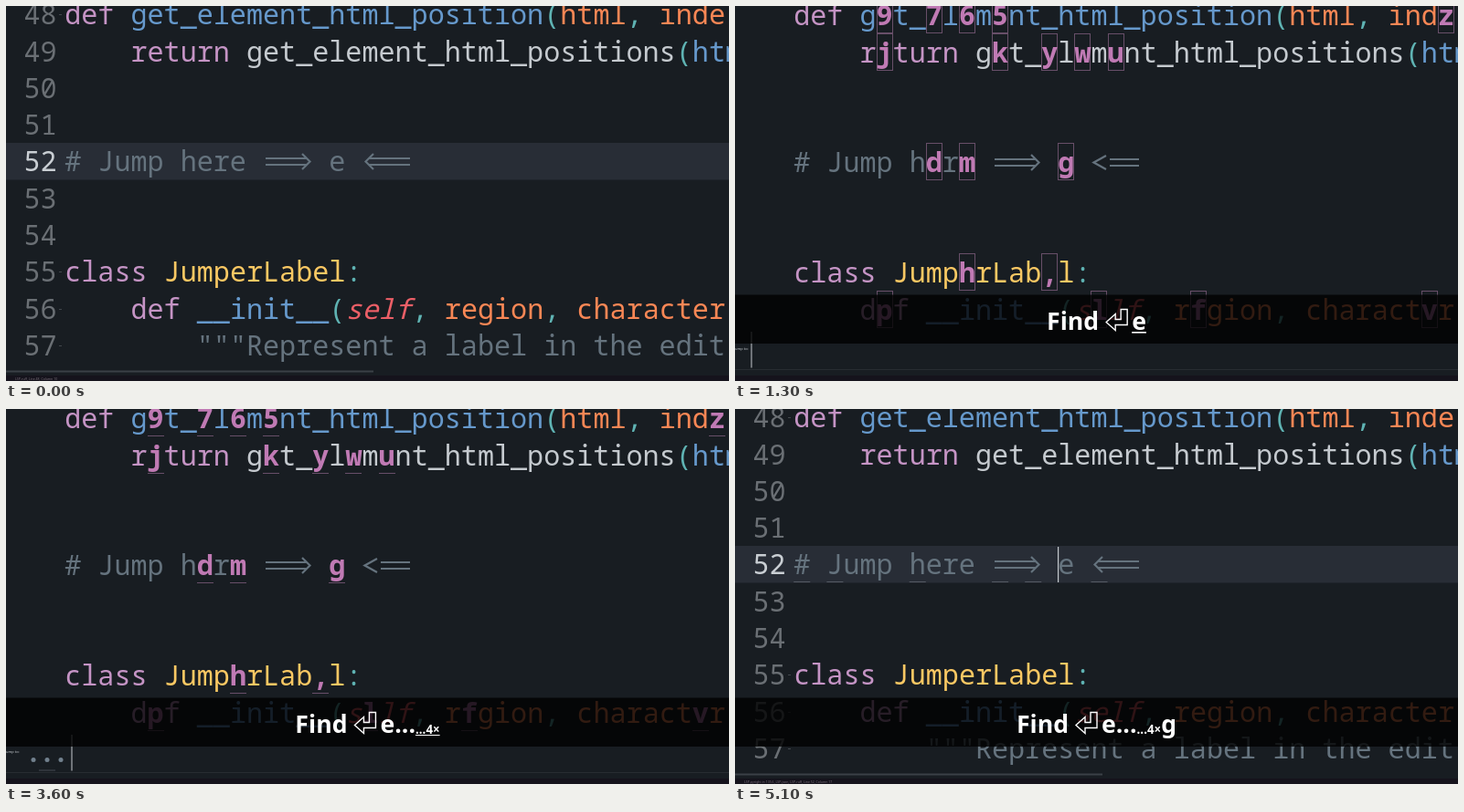
An HTML page with a canvas for the animation above (5.2 s loop, 791x411 px).

```html
<!DOCTYPE html>
<html lang="en">
<head>
<meta charset="utf-8">
<title>Jump to a character</title>
<style>
html, body { margin: 0; width: 100%; height: 100%; overflow: hidden; background: #181d22; }
canvas { display: block; width: 791px; height: 411px; }
</style>
</head>
<body>
<canvas id="stage" width="791" height="411"></canvas>
<script>
const ctx = document.getElementById('stage').getContext('2d');
const W = 791, H = 411, LOOP = 5200, STEP = 100;
const LEFT = 64.2, CHAR = 18.07, ROW = 40.27, FIRST = 48;
const CODE = '30.12px "Noto Sans Mono", "DejaVu Sans Mono", monospace';
const KEYS = '"Noto Sans", "Open Sans", sans-serif';

const C = {
  bg: '#181d22', line: '#282d36', gutter: '#6a6f74', active: '#c9ced3',
  key: '#c594c5', fn: '#6699cc', arg: '#f98755', type: '#fac863', punct: '#5fb3b3',
  plain: '#c5cacf', note: '#65737e', self: '#ec5f67', label: '#c07ab4', edge: '#684f69', fill: '#333b42'
};

// Each token is [column, text, colour].
const code = {
  48: [[0, 'def', C.key], [4, 'get_element_html_position', C.fn], [29, '(', C.punct],
       [30, 'html', C.arg], [34, ',', C.punct], [36, 'inde', C.arg]],
  49: [[4, 'return', C.key], [11, 'get_element_html_positions', C.plain], [37, '(', C.punct], [38, 'htm', C.fn]],
  52: [[0, '# Jump here', C.note], [16, 'e', C.note]],
  55: [[0, 'class', C.key], [6, 'JumperLabel', C.type], [17, ':', C.punct]],
  56: [[4, 'def', C.key], [8, '__init__', C.fn], [16, '(', C.punct], [17, 'self', C.self],
       [21, ',', C.punct], [23, 'region', C.arg], [29, ',', C.punct], [31, 'character', C.arg]],
  57: [[8, '"""Represent a label in the edit', C.note]]
};
const labels = {
  48: { 5: '9', 8: '7', 10: '6', 12: '5', 39: 'z' },
  49: { 5: 'j', 12: 'k', 15: 'y', 17: 'w', 19: 'u' },
  52: { 8: 'd', 10: 'm', 16: 'g' },
  55: { 10: 'h', 15: ',' },
  56: { 5: 'p', 18: 'l', 24: 'f', 38: 'v' }
};

const SHOW = 700, ENTER = 1000, SEARCH = 1300, PICK = 4300;
const DOTS = [1900, 2400, 2900, 3600];

const colX = col => LEFT + col * CHAR;
const rowTop = row => Math.round(-10.6 + (row - FIRST) * ROW);

function rect(x, y, w, h, color) {
  ctx.fillStyle = color;
  ctx.fillRect(x, y, w, h);
}

function text(str, x, y, font, color) {
  ctx.font = font;
  ctx.fillStyle = color;
  ctx.fillText(str, x, y);
}

function path(points, color, width, close) {
  ctx.beginPath();
  points.forEach(([x, y]) => ctx.lineTo(x, y));
  if (close) ctx.closePath();
  ctx.strokeStyle = color;
  ctx.lineWidth = width;
  ctx.stroke();
}

function arrows(y, split) {
  const bar = (a, b) => [-3.5, 3.5].forEach(d => path([[a, y + d], [b, y + d]], C.note, 2));
  bar(284, 329);
  path([[324, y - 8.5], [332.5, y], [324, y + 8.5]], C.note, 2.2);
  if (split) {
    bar(410, 442);
    path([[406, y - 7.5], [392.5, y], [406, y + 7.5]], C.note, 2.3);
  } else {
    bar(397, 442);
    path([[402, y - 8.5], [393.5, y], [402, y + 8.5]], C.note, 2.2);
  }
}

// Style 0 is a full outline, 1 to 3 lose one side each, 4 is a filled cell.
function mark(left, top, style) {
  const x = Math.round(left), y = top - 1, w = 18, h = 41;
  if (style === 4) return rect(x, y, w, h, C.fill);
  if (style === 0) rect(x, y, w, 1, C.edge);
  if (style < 2) rect(x, y, 1, h, C.edge);
  if (style < 3) rect(x + w - 1, y, 1, h, C.edge);
  rect(x, y + h - 1, w, 1, C.edge);
}

function drawCode(shift, tags, style) {
  for (const [key, tokens] of Object.entries(code)) {
    const row = +key, top = rowTop(row) + shift, base = top + 31;
    const tagged = tags && tags[row] || {};
    if (tags && row > 56) continue;
    for (const [col, str, color] of tokens) {
      const shown = [...str].map((c, i) => tagged[col + i] ? ' ' : c).join('');
      text(shown, colX(col), base, (color === C.self ? 'italic ' : '') + CODE, color);
    }
    for (const [col, char] of Object.entries(tagged)) {
      mark(colX(+col), top, style);
      text(char, colX(+col), base, 'bold ' + CODE, C.label);
    }
  }
  arrows(rowTop(52) + shift + 20.5, !!tags);
}

function drawEditor(jumped) {
  rect(0, 150, W, 40.5, C.line);
  for (let row = 48; row <= 57; row++) {
    text(String(row), 19.5, rowTop(row) + 31, CODE, row === 52 ? C.active : C.gutter);
    if (code[row] && row !== 49 && row !== 52) rect(58, rowTop(row) + 20, 3, 1, '#42474c');
  }
  drawCode(0);
  if (jumped) {
    [0, 2, 7, 12, 14, 18].forEach(col => rect(colX(col), 189, CHAR, 1, '#555b64'));
    rect(353, 151, 1.2, 39, '#c5cacf');
  }
  rect(0, 399.5, 402, 2, '#3a4146');
  rect(0, 405, W, 6, '#15131c');
  const status = jumped
    ? 'LSP-pyright in 135.6, LSP-json, LSP-ruff, Line 52, Column 17'
    : 'LSP-ruff, Line 48, Column 10';
  text(status, 10, 409.5, '3.5px ' + KEYS, '#756a75');
}

function drawSearch(count) {
  drawCode(1, labels, count);
  rect(0, 398, W, 1, '#272c31');
  rect(0, 405, W, 6, '#15131c');
  text('ump to:', 0, 377, '4px ' + KEYS, C.plain);
  const gap = [18, 18, 13, 15, 18][count];
  const start = [0, 27, 29.5, 30, 27][count];
  for (let i = 0; i < count; i++) {
    ctx.beginPath();
    ctx.arc(start + i * gap, 384.5, 2.5, 0, 7);
    ctx.fillStyle = '#71808d';
    ctx.fill();
  }
  if (count) {
    const x = [0, 18, 36, 36, 54][count];
    rect(x, 395.5, 18, 1, '#454b52');
    if (count < 3) rect(x + 17, 357, 1, 39, C.edge);
  }
  rect(17.5 + 18 * count, 357, 1, 39.5, '#c5cacf');
}

function enterKey(x) {
  const shape = [[17, 0], [24, 0], [24, 17], [11, 17], [11, 23], [1, 14], [11, 5], [11, 11], [17, 11]];
  path(shape.map(([a, b]) => [x + a, 332.5 + b]), '#fff', 1.4, true);
}

function drawKeys(t) {
  rect(0, 316.5, W, 53.5, 'rgba(0,0,0,.8)');
  const big = 'bold 26.67px ' + KEYS, small = 'bold 13.33px ' + KEYS;
  const dots = DOTS.filter(d => t >= d).length;
  const parts = [{ str: 'Find', at: -1000 }];
  if (t >= ENTER) parts.push({ str: ' ', at: -1000 }, { enter: true, at: ENTER });
  if (t >= SEARCH) parts.push({ str: 'e', at: SEARCH });
  for (let i = 0; i < Math.min(dots, 3); i++) parts.push({ str: '.', at: DOTS[i] });
  if (dots > 3) parts.push({ str: '...4×', small: true, at: DOTS[3] });
  if (t >= PICK) parts.push({ str: 'g', at: PICK });

  for (const p of parts) {
    ctx.font = p.small ? small : big;
    p.width = p.enter ? 29 : ctx.measureText(p.str).width;
  }
  let x = 395.5 - parts.reduce((sum, p) => sum + p.width, 0) / 2;
  const base = t >= ENTER ? 354.5 : 353;
  for (const p of parts) {
    if (p.enter) enterKey(x);
    else text(p.str, x, base + (p.small ? 1.5 : 0), p.small ? small : big, '#fff');
    if (t - p.at < STEP) rect(x, 357, p.width, p.small ? 1 : 1.6, '#fff');
    x += p.width;
  }
}

function draw(t) {
  rect(0, 0, W, H, C.bg);
  // The editor reacts one step after the key is shown.
  const seen = t - STEP;
  if (t >= SEARCH && seen < PICK) drawSearch(DOTS.filter(d => seen >= d).length);
  else drawEditor(seen >= PICK);
  if (t >= SHOW) drawKeys(t);
}

const began = performance.now();
function tick() {
  const t = (performance.now() - began) % LOOP;
  draw(Math.floor(t / STEP) * STEP);
  requestAnimationFrame(tick);
}
tick();
</script>
</body>
</html>
```
